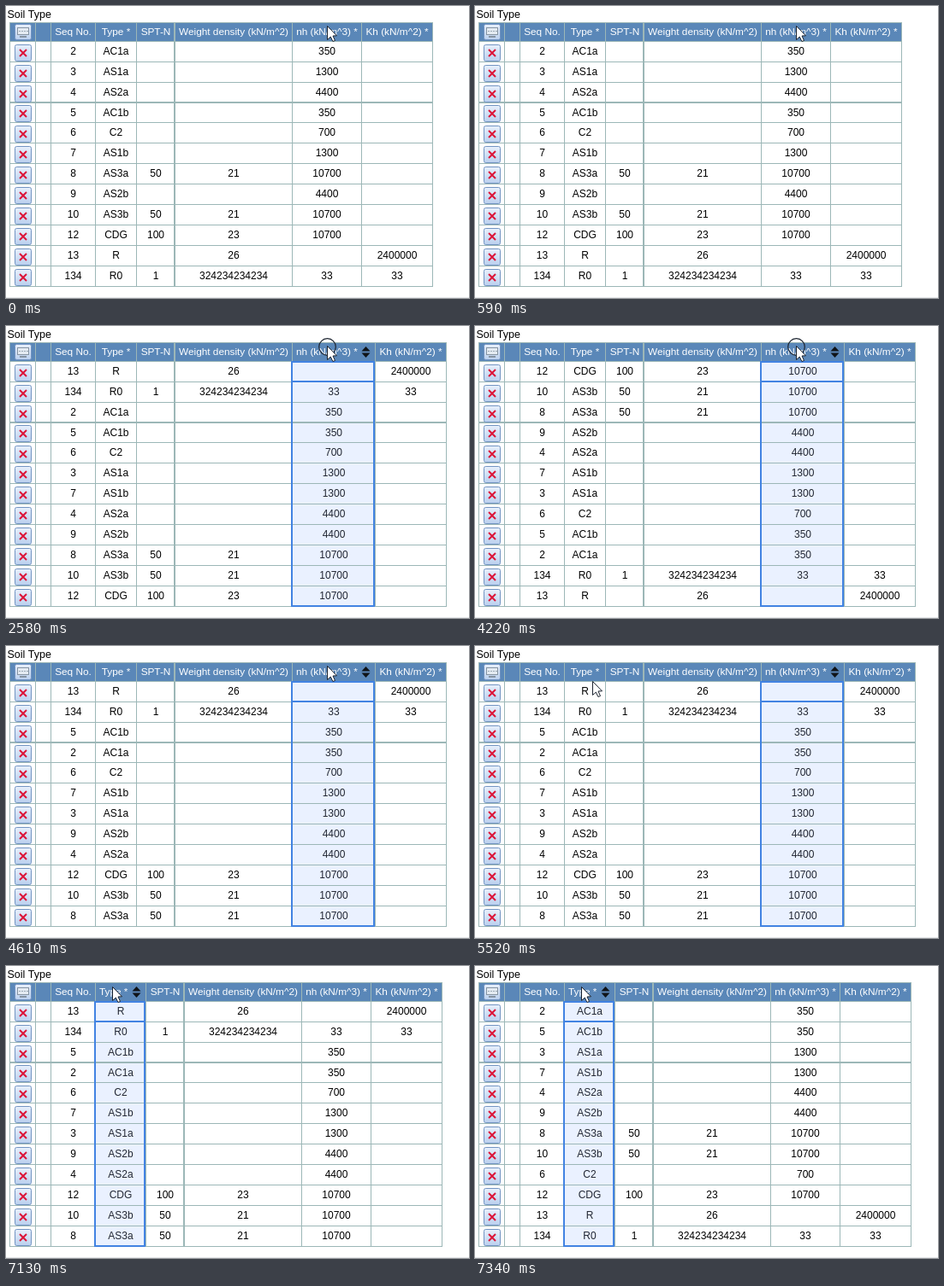
Animation of 541 by 342 pixels, one loop 8 s. Source, as an HTML page with a canvas:

```html
<!DOCTYPE html>
<html lang="en">
<head>
<meta charset="utf-8">
<title>Soil Type</title>
<style>
html, body { margin: 0; width: 541px; height: 342px; overflow: hidden; background: #fff; }
canvas { display: block; }
</style>
</head>
<body>
<canvas id="stage" width="541" height="342"></canvas>
<script>
const g = document.getElementById('stage').getContext('2d');
const LOOP = 8000, TOP = 41, BOTTOM = 328, ROW = (BOTTOM - TOP) / 12;
const FONT = '"Liberation Sans", Arial, sans-serif';
const LINE = '#9cb7b7', BLUE = '#4283e2';
const TYPE = 1, NH = 4;

const columns = [
  { head: 'Seq No.', width: 52 },
  { head: 'Type *', width: 48, grow: 11 },
  { head: 'SPT-N', width: 45 },
  { head: 'Weight density (kN/m^2)', width: 137 },
  { head: 'nh (kN/m^3) *', width: 81, grow: 16 },
  { head: 'Kh (kN/m^2) *', width: 83 }
];
const base = `2,AC1a,,,350,
3,AS1a,,,1300,
4,AS2a,,,4400,
5,AC1b,,,350,
6,C2,,,700,
7,AS1b,,,1300,
8,AS3a,50,21,10700,
9,AS2b,,,4400,
10,AS3b,50,21,10700,
12,CDG,100,23,10700,
13,R,,26,,2400000
134,R0,1,324234234234,33,33`.split('\n').map(line => line.split(','));

const byNh = rows => [...rows].sort((a, b) => a[NH] - b[NH]);
const up = byNh(base), down = [...up].reverse();
const byType = [...base].sort((a, b) => a[TYPE] < b[TYPE] ? -1 : 1);

// The first press of a double click selects the column, the second sorts it
const doubleClicks = [
  { start: 500, end: 770, col: NH, rows: up },
  { start: 2580, end: 2930, col: NH, rows: down },
  { start: 4220, end: 4610, col: NH, rows: byNh(down) },
  { start: 6960, end: 7340, col: TYPE, rows: byType }
];
const SELECT_DELAY = 170, FIRST_PRESS = 75, SECOND_PRESS = 90;

const rowY = i => Math.round(TOP - .2 + i * ROW);

// Progress from 0 to 1 that advances in held steps
function held(t, start, duration, step) {
  const passed = Math.floor((t - start) / step) * step;
  return Math.min(1, Math.max(0, passed / duration));
}

function pointerAt(t) {
  const slide = 1 - (1 - held(t, 5060, 640, 92)) ** 2;
  const settle = held(t, 5766, 296, 74);
  return [
    375 - 258 * slide + 7 * settle - 6 * Math.sin(Math.PI * settle),
    23 + 15 * slide + 15 * Math.sin(Math.PI * slide) - 14 * settle
  ].map(Math.round);
}

function edgesFor(sel) {
  const xs = [52];
  columns.forEach((c, i) => xs.push(xs[i] + c.width + (i === sel ? c.grow : 0)));
  return xs;
}

function rect(color, x, y, w, h) {
  g.fillStyle = color;
  g.fillRect(x, y, w, h);
}

function stroke(color, width) {
  g.strokeStyle = color;
  g.lineWidth = width;
  g.stroke();
}

function text(str, x, y, color = '#000', size = 12, align = 'center') {
  g.font = `${size}px ${FONT}`;
  g.textAlign = align;
  g.fillStyle = color;
  g.fillText(str, x, y);
}

function poly(points, fill) {
  g.beginPath();
  points.forEach(p => g.lineTo(...p));
  g.closePath();
  g.fillStyle = fill;
  g.fill();
}

function button(y, h) {
  const shade = g.createLinearGradient(0, y, 0, y + h);
  shade.addColorStop(0, '#e9f1fc');
  shade.addColorStop(1, '#b9cfee');
  g.beginPath();
  g.roundRect(10.5, y + .5, 19, h - 1, 2);
  g.fillStyle = shade;
  g.fill();
  stroke('#7294c2', 1);
}

function deleteButton(y) {
  button(y, 20);
  g.beginPath();
  for (const s of [-4, 4]) {
    g.moveTo(20 - s, y + 6);
    g.lineTo(20 + s, y + 14);
  }
  stroke('#dc1438', 2);
}

function screenButton() {
  button(21, 19);
  rect('#8694a2', 13, 25, 14, 9);
  rect('#e4ebf2', 14, 26, 12, 7);
  for (let x = 15; x < 25; x += 3) rect('#9aa8b5', x, 29, 2, 1);
  rect('#8694a2', 16, 35, 8, 2);
}

function table(rows, sel) {
  const xs = edgesFor(sel), right = xs[6];
  rect('#5a87b8', 4, 19, right - 4, TOP - 19);
  if (sel !== null) rect('#eaf1ff', xs[sel], TOP, xs[sel + 1] - xs[sel], BOTTOM - TOP);
  for (let i = 0; i <= 12; i++) rect(LINE, 4, rowY(i), right - 3, 1);
  rect(LINE, 4, 19, right - 3, 1);
  rect(LINE, 4, rowY(3) - 1, right - 3, 1);
  rect(LINE, xs[3] - 1, 19, 1, BOTTOM - 18);
  for (const x of [4, 34, ...xs]) rect(LINE, x, 19, 1, BOTTOM - 18);

  screenButton();
  columns.forEach(({ head }, c) => {
    if (c === sel) text(head, xs[c] + 5, 34, '#fff', 11.8, 'left');
    else text(head, (xs[c] + xs[c + 1]) / 2 + .5, 34, '#fff', 11.8);
  });
  rows.forEach((row, r) => {
    const y = TOP + r * ROW;
    deleteButton(Math.round(y + 3.7));
    row.forEach((cell, c) =>
      text(cell, (xs[c] + xs[c + 1]) / 2 + .5, Math.round(y + 15.8), c === sel ? '#222732' : '#000'));
  });
  if (sel !== null) selection(xs[sel], xs[sel + 1] - 1);
}

function selection(left, right) {
  const x = right - 9.5;
  for (const s of [-1, 1]) {
    const y = 30.5 + s;
    poly([[x - 5, y], [x + 5, y], [x, y + 5.5 * s]], '#101418');
  }
  g.strokeStyle = BLUE;
  g.lineWidth = 2;
  g.strokeRect(left, TOP + 1, right - left, BOTTOM - TOP - 1);
  rect(BLUE, left, rowY(1) - 1, right - left, 2);
}

function pointer(x, y) {
  const shape = [[0, 0], [0, 16], [3.8, 12.6], [6.4, 18], [9, 17], [6.5, 11.5], [11, 11.3]];
  poly(shape.map(([dx, dy]) => [x + dx + .5, y + dy + .5]), '#fff');
  stroke('#1c2430', 1);
}

function ring(x, y) {
  g.beginPath();
  g.arc(x + .5, y + 1.5, 9.8, 0, 7);
  stroke('#1c2430', 1.2);
}

function draw(now) {
  const t = now % LOOP;
  let rows = base, sel = null, pressed = false;
  for (const click of doubleClicks) {
    if (t >= click.start + SELECT_DELAY) sel = click.col;
    if (t >= click.end) rows = click.rows;
    pressed ||= t >= click.start && t < click.start + FIRST_PRESS;
    pressed ||= t >= click.end - SECOND_PRESS && t < click.end;
  }
  const tip = pointerAt(t);
  rect('#fff', 0, 0, 541, 342);
  rect('#e6e8ea', 0, 341, 541, 1);
  text('Soil Type', 1.5, 14, '#000', 12.5, 'left');
  table(rows, sel);
  if (pressed) ring(...tip);
  pointer(...tip);
}

const start = performance.now();
function tick() {
  draw(performance.now() - start);
  requestAnimationFrame(tick);
}
tick();
</script>
</body>
</html>
```
